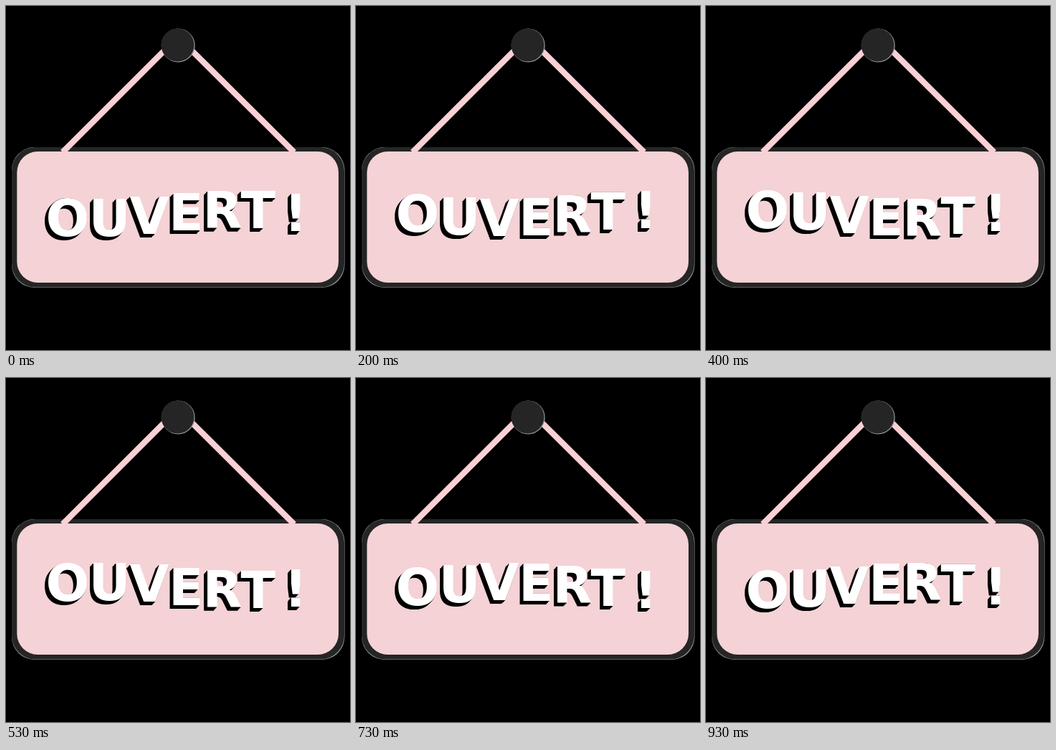
These frames come from a looping animation (480 px wide and 480 px high, 990 ms). An HTML page with a canvas:

```html
<!DOCTYPE html>
<html lang="fr">
<head>
<meta charset="utf-8">
<title>Ouvert !</title>
<style>
  html, body { margin: 0; width: 100%; height: 100%; overflow: hidden; background: #000; }
  canvas { display: block; }
</style>
</head>
<body>
<canvas id="stage" width="480" height="480"></canvas>
<script>
const ctx = document.getElementById('stage').getContext('2d');
const LOOP = 990, STEPS = 15;
const DARK = '#252525', PINK = '#f4d2d5', ROPE = '#f8d0d5', FRINGE = '#9a9ca0';
const BASELINE = 315.5, SWING = 5.7, LAG = 1.9, CREST = 6.5;

// Each letter with the centre of its ink
const letters = [['O', 86], ['U', 144.5], ['V', 200], ['E', 252], ['R', 304.5], ['T', 352], ['!', 404.5]];

function box(x, y, w, h, r, color) {
  ctx.fillStyle = color;
  ctx.beginPath();
  ctx.roundRect(x, y, w, h, r);
  ctx.fill();
}

function disc(x, y, r, color) {
  box(x - r, y - r, 2 * r, 2 * r, r, color);
}

function drawSign() {
  ctx.fillStyle = '#000';
  ctx.fillRect(0, 0, 480, 480);
  box(8, 197, 464.5, 196, 32, FRINGE);
  box(8, 197, 464, 195.4, 33, DARK);
  box(15.3, 203, 448.7, 183, 29, PINK);
  ctx.strokeStyle = ROPE;
  ctx.lineWidth = 8.3;
  ctx.beginPath();
  ctx.moveTo(79, 204);
  ctx.lineTo(240, 43);
  ctx.lineTo(402, 204);
  ctx.stroke();
  disc(240.2, 55, 23.5, FRINGE);
  disc(239.5, 54.5, 23, DARK);
}

function drawLetter(char, center, y) {
  const ink = ctx.measureText(char);
  const x = center - (ink.actualBoundingBoxRight - ink.actualBoundingBoxLeft) / 2;
  ctx.fillStyle = '#000';
  for (let depth = 1; depth > 0; depth -= 0.125) ctx.fillText(char, x - 5 * depth, y + 5 * depth);
  ctx.fillStyle = '#fff';
  ctx.fillText(char, x, y);
}

function draw(now) {
  // Steps begin on whole hundredths of a second
  const t = Math.floor((now % LOOP) / 10) * 10;
  const step = Math.floor((t + 3.4) * STEPS / 1000);
  drawSign();
  ctx.font = 'bold 71.5px "DejaVu Sans", sans-serif';
  letters.forEach(([char, center], i) => {
    const phase = 2 * Math.PI * (step - CREST - LAG * i) / STEPS;
    drawLetter(char, center, BASELINE - SWING * Math.cos(phase));
  });
  requestAnimationFrame(draw);
}

draw(0);
</script>
</body>
</html>
```
